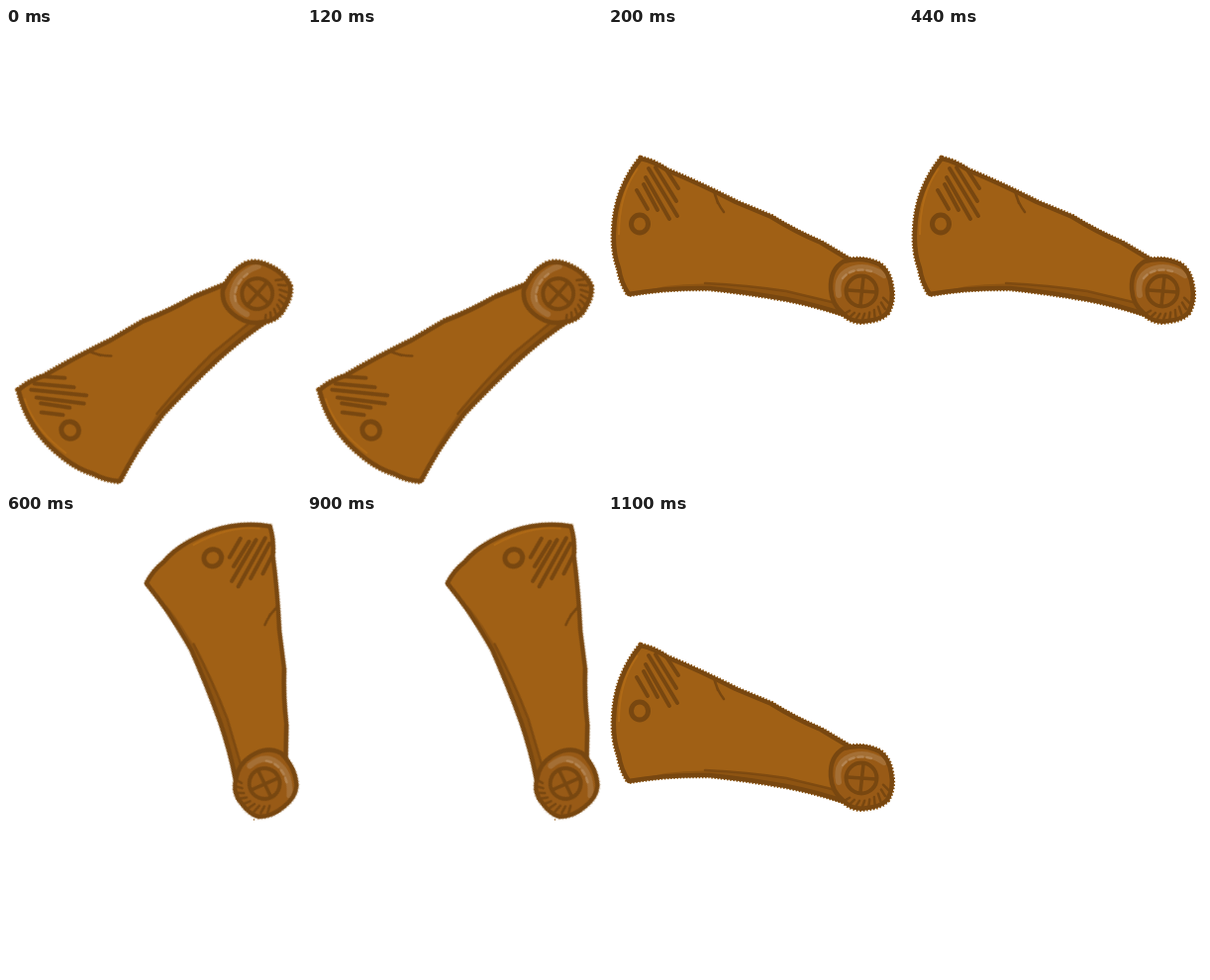
An HTML page that plays this animation: 298x464 px, repeating every 1300 ms.

```html
<!DOCTYPE html>
<html lang="en">
<head>
<meta charset="utf-8">
<title>Swinging lever</title>
<style>
  html, body { margin: 0; width: 100%; height: 100%; overflow: hidden; background: #fff; }
  svg { display: block; width: 298px; height: 464px; }
  .fill { fill: #a06015; }
  .line { fill: none; stroke: #784710; stroke-linecap: round; stroke-linejoin: round; }
  .fringe { fill: none; stroke: #8a5009; stroke-width: 6.5; stroke-dasharray: 1.5 1.7; }
</style>
</head>
<body>
<svg viewBox="0 0 298 464">
  <defs>
    <path id="body" d="M33 132 Q47 135 60 144 Q94 158 129 176 L165 191 Q189 206 215 217 L245 235 L262 270 L240 290
      Q211 280 180 274 Q140 267 102 263 Q60 262 21 269 Q13 257 11 243 Q5 227 6 206 Q7 164 33 132Z"/>
    <path id="cap" d="M238 236 Q258 231 274 239 Q284 246 286 261 Q289 276 282 288 Q275 295 262 296
      Q248 299 238 289 Q226 280 225 264 Q224 244 238 236Z"/>
  </defs>
  <g id="lever">
    <g transform="translate(-256 -265)">
      <g id="fringe" class="fringe"><use href="#body"/><use href="#cap"/></g>
      <use href="#body" class="fill"/>
      <path d="M21 269 Q60 262 102 263 Q140 267 180 274 L238 289 L226 277 Q180 265 140 261 Q95 256 58 261Z" fill="#8e5412"/>
      <path class="line" d="M98 258 Q141 260 180 266 L226 277" stroke-width="2.5" opacity=".8"/>
      <path d="M30 142 Q11 168 11 209" fill="none" stroke="#b06a16" stroke-width="2"/>
      <use href="#body" class="line" stroke-width="4.5"/>
      <path class="line" d="M107 165 Q110 177 117 186 M107 165 L111 177" stroke-width="2.5"/>
      <path id="hatch" class="line" stroke-width="4"/>
      <ellipse class="line" cx="32" cy="198" rx="8.5" ry="9" stroke-width="5" fill="#8c5312"/>

      <use href="#cap" fill="#985a16"/>
      <path d="M233 270 Q229 248 249 243 Q263 239 279 250" fill="none" stroke="#a9763f" stroke-width="6" stroke-linecap="round" opacity=".75"/>
      <path d="M237 253 Q247 241 266 246" fill="none" stroke="#b78a59" stroke-width="2.5" stroke-linecap="round" stroke-dasharray="5 4" opacity=".8"/>
      <use href="#cap" class="line" stroke-width="4.5"/>
      <path id="teeth" class="line" stroke-width="2.5"/>
      <circle class="line" cx="256" cy="266" r="15.5" stroke-width="4"/>
      <path class="line" d="M258 252 L255 280 M242 265 L270 267" stroke-width="3.5"/>
    </g>
  </g>
  <circle id="speck" cx="250.5" cy="308" r=".7" fill="#8a5009"/>
</svg>
<script>
  const $ = id => document.getElementById(id);

  const strokes = [
    [58, 142, 71, 162], [48, 141, 69, 175], [41, 142, 70, 190],
    [38, 151, 62, 193], [36, 158, 50, 184], [29, 164, 40, 183]
  ];
  $('hatch').setAttribute('d', strokes.map(([a, b, c, d]) => `M${a} ${b}L${c} ${d}`).join(''));

  const polar = (r, deg) => {
    const a = deg * Math.PI / 180;
    return `${256 + r * Math.cos(a)} ${266 + r * Math.sin(a)}`;
  };
  let teeth = '';
  for (let a = 24; a <= 128; a += 13) teeth += `M${polar(23, a - 7)}L${polar(30, a)}`;
  $('teeth').setAttribute('d', teeth);

  const duration = 1300;
  const pose = (x, y, turn) => `translate(${x}px, ${y}px) rotate(${turn}deg)`;
  const low = pose(253, 268, -53), mid = pose(256, 265, 0), high = pose(262, 271, 60.2);

  // Each step is [start time in ms, pose, fringe opacity, speck opacity].
  const steps = [[0, low, 1, 0], [200, mid, 1, 0], [600, high, 0.25, 1], [1100, mid, 1, 0], [1300, low, 1, 0]];
  const play = (id, frame) => $(id).animate(
    steps.map(step => ({ offset: step[0] / duration, easing: 'steps(1, end)', ...frame(step) })),
    { duration, iterations: Infinity }
  );
  const tracks = [
    play('lever', s => ({ transform: s[1] })),
    play('fringe', s => ({ opacity: s[2] })),
    play('speck', s => ({ opacity: s[3] }))
  ];
  tracks.forEach(t => { t.startTime = document.timeline.currentTime; });
</script>
</body>
</html>
```
